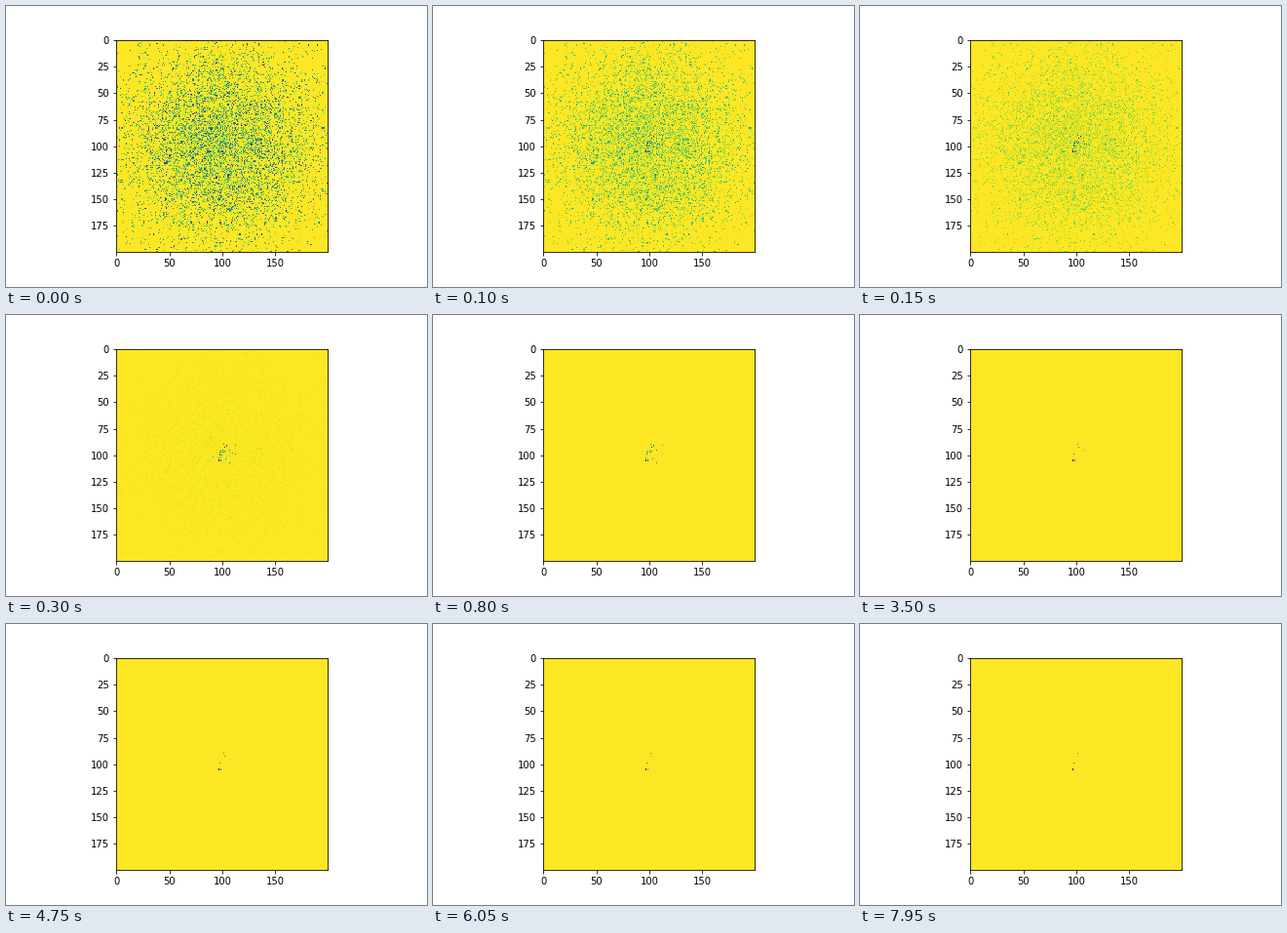
Recreate the animation shown at these times as a matplotlib script. Size 432x288 px, loop 8000 ms.

```python
import numpy as np
import matplotlib.pyplot as plt
from matplotlib.animation import FuncAnimation

FRAMES, INTERVAL = 160, 50
SIZE = 200
CLOUD_FADE = 0.09  # seconds

rng = np.random.default_rng(7)

# Wide Gaussian cloud that fades within a second.
spots = rng.normal(SIZE / 2, 50, (9500, 2)).astype(int)
cols, rows = spots[((spots >= 0) & (spots < SIZE)).all(axis=1)].T
cloud = np.zeros((SIZE, SIZE))
cloud[rows, cols] = rng.beta(1.3, 2.2, len(rows))

# Small core whose dots go out one by one.
core = np.zeros((SIZE, SIZE))
fade = np.ones((SIZE, SIZE))


def add_dot(row, col, depth, tau):
    core[row, col], fade[row, col] = depth, tau
    cloud[row, col] = 0


for tau in np.geomspace(0.15, 3.4, 28):
    row, col = rng.normal((98, 102), (5, 5)).clip((90, 91), (107, 112))
    add_dot(int(row), int(col), rng.uniform(0.25, 0.55), tau)

# The last dots to remain: row, column, depth, fade time.
for dot in [(90, 101, 0.34, 22), (93, 102, 0.57, 5.3), (99, 97, 0.47, 20),
            (105, 96, 0.60, 60), (105, 98, 0.42, 6)]:
    add_dot(*dot)


def field(t):
    """Brightness at time t, scaled so that the deepest dot is 0."""
    depth = cloud * np.exp(-t / CLOUD_FADE) + core * np.exp(-(t / fade) ** 2)
    return 1 - depth / depth.max()


plt.rcParams.update({"font.family": "DejaVu Sans", "font.size": 10})
fig = plt.figure(figsize=(6, 4), dpi=72, facecolor="white")
fig.subplots_adjust(left=0.125, right=0.9, bottom=0.125, top=0.88)
ax = fig.add_subplot()
image = ax.imshow(field(0), cmap="viridis", vmin=0, vmax=1,
                  interpolation="nearest")
ax.set_xticks(range(0, SIZE, 50))
ax.set_yticks(range(0, SIZE, 25))


def update(i):
    image.set_data(field(i * INTERVAL / 1000))
    return [image]


anim = FuncAnimation(fig, update, frames=FRAMES, interval=INTERVAL,
                     repeat=True, repeat_delay=0)
plt.show()
```
